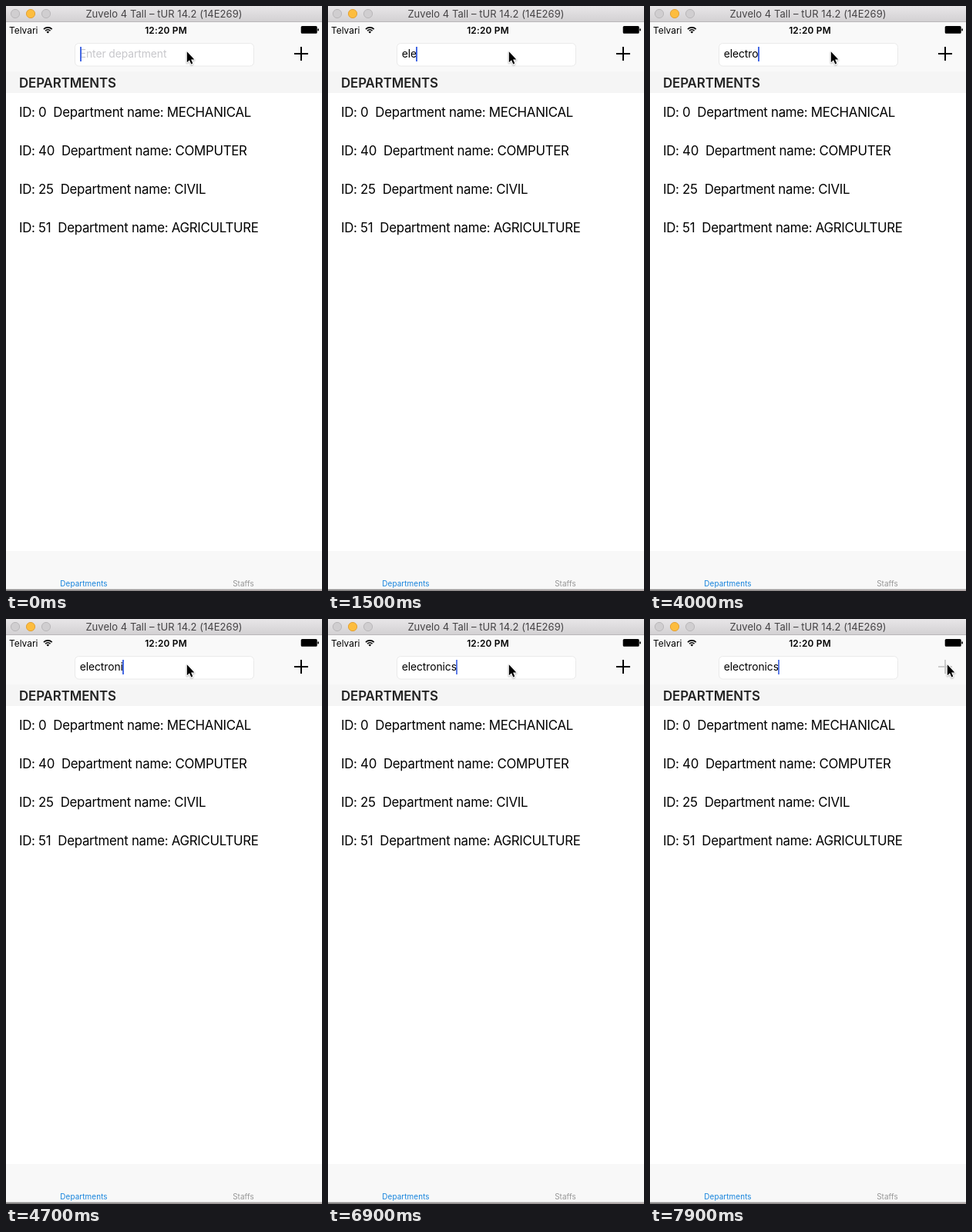
These frames come from a looping animation (410 px wide and 760 px high, 8000 ms). An HTML page with a canvas:

```html
<!DOCTYPE html>
<html lang="en">
<head>
<meta charset="utf-8">
<title>Departments</title>
<style>
html, body { margin: 0; width: 410px; height: 760px; overflow: hidden; background: #fff; }
canvas { display: block; }
</style>
</head>
<body>
<canvas id="stage" width="410" height="760"></canvas>
<script>
const ctx = document.getElementById('stage').getContext('2d');
const LOOP = 8000, TICK = 100, WORD = 'electronics';
// Moment at which each letter of WORD appears
const KEYS = [1200, 1400, 1500, 2300, 3200, 3500, 3700, 4200, 4400, 5100, 5400];
const PATH = [[6900, 234], [7100, 270], [7300, 350], [7500, 392], [7700, 385]];
const ROWS = ['0  Department name: MECHANICAL', '40  Department name: COMPUTER',
  '25  Department name: CIVIL', '51  Department name: AGRICULTURE'];
const ARROW = new Path2D('M0 0V14L3.2 11L5.5 16.3L7.5 15.4L5.3 10.2H9.6Z');

const clamp = v => Math.max(0, Math.min(1, v));

function box(x, y, w, h, color) {
  ctx.fillStyle = color;
  ctx.fillRect(x, y, w, h);
}

function gradient(x, y, from, to) {
  const shade = ctx.createLinearGradient(0, 0, x, y);
  shade.addColorStop(0, from);
  shade.addColorStop(1, to);
  return shade;
}

function label(str, x, y, size, spacing, color = '#000', weight = 400, align = 'left') {
  ctx.font = `${weight} ${size}px Inter, Roboto, sans-serif`;
  ctx.letterSpacing = spacing + 'px';
  ctx.textAlign = align;
  ctx.fillStyle = color;
  ctx.fillText(str, x, y);
}

function titleBar() {
  box(0, 0, 410, 20, gradient(0, 20, '#e8e6e8', '#d3d1d3'));
  box(0, 20, 410, 1, '#b9b7b9');
  [['#d0ced0', '#b9b7b9'], ['#fdbd3e', '#e2a137'], ['#d0ced0', '#b9b7b9']].forEach(([fill, edge], i) => {
    ctx.beginPath();
    ctx.arc(12 + 20 * i, 10, 5.6, 0, 7);
    ctx.fillStyle = fill;
    ctx.fill();
    ctx.lineWidth = 1;
    ctx.strokeStyle = edge;
    ctx.stroke();
  });
  label('Zuvelo 4 Tall – tUR 14.2 (14E269)', 205, 15, 13, 0.05, '#454345', 400, 'center');
}

function statusBar() {
  label('Telvari', 4, 35.5, 11.9, 0);
  label('12:20 PM', 207.5, 35.5, 11.9, 0.2, '#000', 600, 'center');
  ctx.strokeStyle = '#000';
  [[1.3, 2.6], [4.6, 1.6], [7.6, 1.6]].forEach(([r, width]) => {
    ctx.lineWidth = width;
    ctx.beginPath();
    ctx.arc(54.3, 35.5, r, -Math.PI * 0.75, -Math.PI * 0.25);
    ctx.stroke();
  });
  ctx.fillStyle = '#000';
  ctx.beginPath();
  ctx.roundRect(382.7, 26, 21, 9.7, 1.5);
  ctx.roundRect(404.3, 29.3, 1.6, 3.2, 0.7);
  ctx.fill();
}

function caretAlpha(t, typed) {
  const p = t - (typed ? KEYS[typed - 1] : -100);
  if (p < 500) return 1;
  const q = (p + 50) % 1000;
  return q < 520 ? clamp(q / 150) : clamp(1 - (q - 520) / 230);
}

function field(t) {
  ctx.beginPath();
  ctx.roundRect(89.5, 48.5, 232, 29.5, 5);
  ctx.fillStyle = '#fff';
  ctx.fill();
  ctx.lineWidth = 1;
  ctx.strokeStyle = '#eaeaea';
  ctx.stroke();

  const typed = KEYS.filter(k => k <= t).length, str = WORD.slice(0, typed);
  label(str || 'Enter department', 95.7, 67.3, 13.86, -0.08, typed ? '#000' : '#c7c7cb');
  const x = Math.max(96, Math.round(95 + ctx.measureText(str).width));
  ctx.globalAlpha = caretAlpha(t, typed);
  box(x, 53, 2, 19, '#4569e4');
  ctx.globalAlpha = 1;
}

function plus(pressed) {
  const color = pressed ? '#cccccc' : '#000';
  box(374, 61, 18, 2, color);
  box(382, 53, 2, 18, color);
}

function pointerX(t) {
  if (t <= PATH[0][0]) return PATH[0][1];
  const i = PATH.findIndex(p => p[0] > t);
  if (i < 0) return PATH[PATH.length - 1][1];
  const [t0, x0] = PATH[i - 1], [t1, x1] = PATH[i];
  return x0 + (x1 - x0) * (t - t0) / (t1 - t0);
}

function pointer(x) {
  ctx.save();
  ctx.translate(x + 0.8, 59.2);
  ctx.lineJoin = 'round';
  ctx.lineWidth = 2;
  ctx.strokeStyle = '#fff';
  ctx.shadowColor = 'rgba(0, 0, 0, 0.3)';
  ctx.shadowBlur = 2;
  ctx.shadowOffsetY = 1;
  ctx.stroke(ARROW);
  ctx.shadowColor = 'transparent';
  ctx.fillStyle = '#000';
  ctx.fill(ARROW);
  ctx.restore();
}

function draw(t) {
  box(0, 0, 410, 760, '#fff');
  box(0, 21, 410, 64, '#f9f9f9');
  titleBar();
  statusBar();
  field(t);
  plus(t >= 7900);

  box(0, 85, 410, 28, '#f5f5f5');
  label('DEPARTMENTS', 17, 106, 16.84, -0.08, '#222', 600);
  ROWS.forEach((row, i) => label('ID: ' + row, 17, 144.4 + 50 * i, 16.84, -0.28));

  box(0, 708, 410, 49, '#f8f8f8');
  label('Departments', 101, 753.5, 9.9, 0.1, '#1583dc', 400, 'center');
  label('Staffs', 308, 753.5, 9.9, 0.1, '#959595', 400, 'center');
  box(0, 757, 410, 1, '#d2d2d2');
  box(0, 758, 410, 2, gradient(410, 0, '#868484', '#b3abab'));
  pointer(pointerX(t));
}

const start = performance.now();
function frame() {
  const t = (performance.now() - start) % LOOP;
  draw(Math.floor(t / TICK) * TICK);
  requestAnimationFrame(frame);
}
frame();
</script>
</body>
</html>
```
